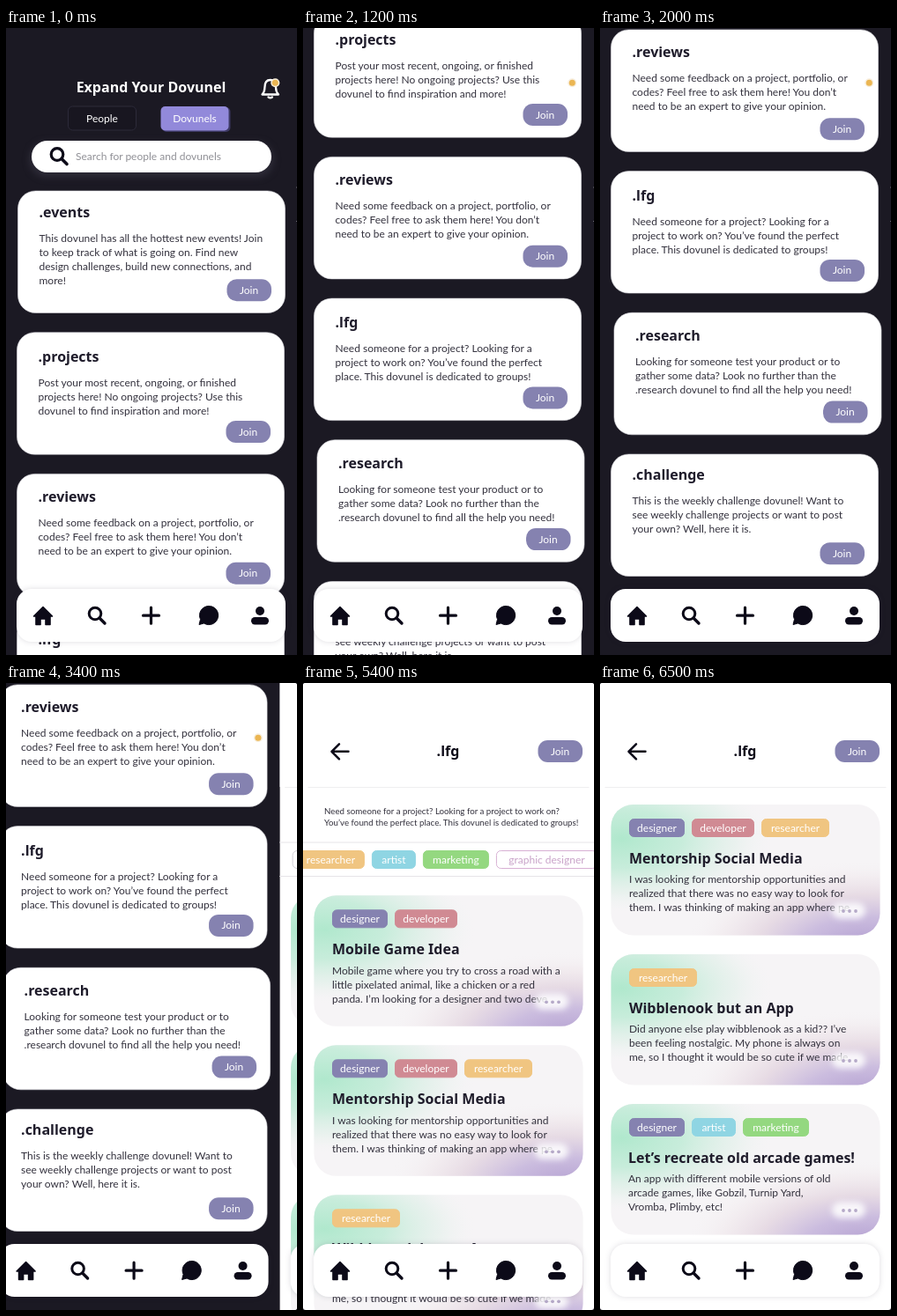
An HTML page that plays this animation: 330 px wide and 712 px high, repeating every 7900 ms.

```html
<!DOCTYPE html>
<html lang="en">
<head>
<meta charset="utf-8">
<style>
  html, body { margin: 0; height: 100%; overflow: hidden; background: #1b1923; }
  svg { display: block; width: 100%; height: 100%; border-radius: 3px; }
  text { font: 12px Lato, sans-serif; fill: #33313d; }
  .title { font: bold 16px "Noto Sans", sans-serif; fill: #1f1c2b; }
  .small { font-size: 9.75px; }
  .nav { filter: drop-shadow(0 0 3px rgba(30, 20, 50, .15)); }
  .glow { filter: blur(3.5px); }
</style>
</head>
<body>
<svg id="stage" viewBox="0 0 330 712">
  <defs>
    <radialGradient id="mint" cx=".04" cy=".26" r=".56">
      <stop offset="0" stop-color="#b0e8cd"/>
      <stop offset=".4" stop-color="#bfebd6" stop-opacity=".85"/>
      <stop offset=".75" stop-color="#dcefe6" stop-opacity=".5"/>
      <stop offset="1" stop-color="#f0f4f3" stop-opacity="0"/>
    </radialGradient>
    <radialGradient id="lilac" cx=".95" cy="1.1" r=".68">
      <stop offset="0" stop-color="#b09ccf"/>
      <stop offset=".35" stop-color="#c6b6dc" stop-opacity=".9"/>
      <stop offset=".6" stop-color="#e3d5e0" stop-opacity=".8"/>
      <stop offset=".8" stop-color="#f0e8ec" stop-opacity=".6"/>
      <stop offset="1" stop-color="#f6f4f6" stop-opacity="0"/>
    </radialGradient>
  </defs>
</svg>
<script>
const INK = '#0c0a18', PURPLE = '#8582b0';

const rect = (x, y, w, h, r, fill, extra = '') =>
  `<rect x="${x}" y="${y}" width="${w}" height="${h}" rx="${r}" fill="${fill}" ${extra}/>`;
const text = (x, y, str, extra = '') => `<text x="${x}" y="${y}" ${extra}>${str}</text>`;
const centered = (x, y, str, color, extra = '') =>
  text(x, y, str, `text-anchor="middle" style="fill:${color}" ${extra}`);
const line = (d, width, color = INK) =>
  `<path d="${d}" fill="none" stroke="${color}" stroke-width="${width}" stroke-linecap="round" stroke-linejoin="round"/>`;
const group = (id, body) => `<g id="${id}">${body}</g>`;
const paragraph = (x, y, lines, step = 16, extra = '') =>
  lines.map((str, i) => text(x, y + i * step, str, extra)).join('');
const join = (x, y) => rect(x, y, 50.5, 25, 11, PURPLE) + centered(x + 25, y + 16.5, 'Join', '#fff');
const magnifier = (x, y, width) =>
  `<circle cx="${x - 2}" cy="${y - 2}" r="6.8" fill="none" stroke="${INK}" stroke-width="${width}"/>` +
  line(`M${x + 3.5} ${y + 3.5}l5.5 5.5`, width + .4);

const navBar = () => `<g class="nav">${rect(12, 637, 305, 60, 17, '#fff')}</g>` +
  `<path d="M31.5 668L42 657.5L52.5 668H50V677.5H45V671H39V677.5H34V668Z" fill="${INK}" stroke="${INK}" stroke-width="1.6" stroke-linejoin="round"/>` +
  magnifier(103, 667, 3) +
  line('M155.5 667.2h18M164.5 658.2v18', 3.2) +
  `<path d="M219 677.5l1.5-6a10.6 10.6 0 1 1 4 4.5z" fill="${INK}" stroke="${INK}" stroke-linejoin="round"/>` +
  `<circle cx="288" cy="662" r="5" fill="${INK}"/>` + rect(278, 669, 20, 8.5, 4.2, INK);

// First screen: groups to join
const groups = [
  ['.events', 13, 57.5, ['This dovunel has all the hottest new events! Join', 'to keep track of what is going on. Find new', 'design challenges, build new connections, and', 'more!']],
  ['.projects', 12, 61.5, ['Post your most recent, ongoing, or finished', 'projects here! No ongoing projects? Use this', 'dovunel to find inspiration and more!']],
  ['.reviews', 12, 59.5, ['Need some feedback on a project, portfolio, or', 'codes? Feel free to ask them here! You don’t', 'need to be an expert to give your opinion.']],
  ['.lfg', 12, 61, ['Need someone for a project? Looking for a', 'project to work on? You’ve found the perfect', 'place. This dovunel is dedicated to groups!']],
  ['.research', 15.5, 60, ['Looking for someone test your product or to', 'gather some data? Look no further than the', '.research dovunel to find all the help you need!']],
  ['.challenge', 12, 56.5, ['This is the weekly challenge dovunel! Want to', 'see weekly challenge projects or want to post', 'your own? Well, here it is.']],
];
const groupCard = ([title, x, top, lines], i) => {
  const y = 185 + i * 160.7;
  return rect(x + .5, y, 303, 138.5, 20, '#fff', 'stroke="#d9d8de" stroke-width=".6"') +
    text(x + 24.5, y + top - 28, title, 'class="title"') +
    paragraph(x + 24.5, y + top, lines) + join(x + 237.5, y + 100.3);
};

const exploreScreen = rect(0, 0, 330, 712, 0, '#1b1923') +
  group('groupList',
    centered(164.5, 72.5, 'Expand Your Dovunel', '#fff', 'class="title" ') +
    rect(70.5, 89, 77, 27, 5, '#181620', 'stroke="#2c2a39"') + centered(109, 106.5, 'People', '#fff') +
    rect(177, 90, 77.5, 28, 5, '#3d3963') + rect(175.5, 89, 77, 27.5, 5, '#9289da') +
    centered(214, 107, 'Dovunels', '#fff') +
    rect(26, 129, 278, 41, 20, '#2b2935', 'class="glow"') + rect(29, 128, 272, 36, 18, '#fff') +
    magnifier(60, 145.5, 3.2) + text(79, 149.5, 'Search for people and dovunels', 'style="fill:#909096"') +
    groups.map(groupCard).join('')) +
  line('M290.5 75.5h18.5c-2.5-2.5-3-4-3-8c0-5-2-8.5-6.3-8.5s-6.3 3.5-6.3 8.5c0 4-.5 5.5-2.9 8zM297.5 78.5q2.2 1.6 4.4 0', 2.3, '#fff') +
  '<circle cx="305.3" cy="62.3" r="5" fill="#f7eedd"/><circle cx="305.3" cy="62.3" r="3.5" fill="#ebb653"/>' +
  navBar();

// Second screen: posts inside one group
const tags = {
  All: [34, '#fff', '#33313d', '#cfced4'],
  designer: [63, PURPLE], developer: [71, '#d08a93'], researcher: [77, '#f0c581'],
  artist: [50, '#8fd5e3'], marketing: [75, '#94d880'],
  'graphic designer': [115, '#fff', '#c9a3c9', '#d7b0d4'],
};
const tagRow = (x, y, names) => names.map(name => {
  const [w, fill, color = '#fff', border = fill] = tags[name];
  const tag = rect(x + .5, y + .5, w - 1, 20, 5, fill, `stroke="${border}"`) + centered(x + w / 2, y + 14.7, name, color);
  x += w + 8;
  return tag;
}).join('');

const posts = [
  ['Mobile Game Idea', ['designer', 'developer'], ['Mobile game where you try to cross a road with a', 'little pixelated animal, like a chicken or a red', 'panda. I’m looking for a designer and two deve']],
  ['Mentorship Social Media', ['designer', 'developer', 'researcher'], ['I was looking for mentorship opportunities and', 'realized that there was no easy way to look for', 'them. I was thinking of making an app where pe']],
  ['Wibblenook but an App', ['researcher'], ['Did anyone else play wibblenook as a kid?? I’ve', 'been feeling nostalgic. My phone is always on', 'me, so I thought it would be so cute if we made']],
  ['Let’s recreate old arcade games!', ['designer', 'artist', 'marketing'], ['An app with different mobile versions of old', 'arcade games, like Gobzil, Turnip Yard,', 'Vromba, Plimby, etc!']],
];
const postCard = ([title, names, lines], i) => {
  const y = 241.3 + i * 170, x = i === 3 ? 32 : 33;
  return ['#f6f4f6', 'url(#mint)', 'url(#lilac)'].map(fill => rect(12.5, y, 305, 148.5, 25, fill)).join('') +
    tagRow(33, y + 16, names) + text(x, y + 66.7, title, 'class="title"') +
    paragraph(x, y + 89.3, lines) +
    rect(263, y + 111.5, 38, 18, 9, '#fff', 'class="glow" opacity=".85"') +
    [276, 283, 290].map(cx => `<circle cx="${cx}" cy="${y + 121}" r="1.9" fill="#b5a9c8"/>`).join('');
};

const groupScreen = rect(0, 0, 330, 712, 0, '#fff') +
  group('postList',
    paragraph(24, 148.5, ['Need someone for a project? Looking for a project to work on?', 'You’ve found the perfect place. This dovunel is dedicated to groups!'], 13.5, 'class="small"') +
    line('M0 181h330M0 219.5h330', 1, '#e6e4e8') +
    group('filters', tagRow(14, 190, Object.keys(tags))) +
    posts.map(postCard).join('')) +
  rect(0, 0, 330, 118, 0, '#fff') + line('M6 118.5h318', 1, '#efeef0') +
  line('M51.5 77.8h-19m8.5-8.5l-8.5 8.5l8.5 8.5', 2.5) +
  centered(164.5, 83, '.lfg', INK, 'class="title"') + join(266.5, 65) + navBar();

const stage = document.getElementById('stage');
stage.insertAdjacentHTML('beforeend',
  group('explore', exploreScreen) + group('group', groupScreen));

const move = (id, x, y) =>
  document.getElementById(id).setAttribute('transform', `translate(${x} ${y})`);
const ease = (t, from, to) => {
  const p = Math.min(1, Math.max(0, (t - from) / (to - from)));
  return p * p / (p * p + (1 - p) * (1 - p));
};

function draw(now) {
  const t = Math.floor(now % 7900 / 100) * 100; // the picture advances ten times a second
  const slide = 330 * ease(t, 3300, 3800);
  move('explore', -slide, 0);
  move('group', 330 - slide, 0);
  move('groupList', 0, -360 * ease(t, 800, 1200) - 95 * ease(t, 1300, 1600) - 49.5 * ease(t, 1800, 2000));
  move('filters', -231 * (ease(t, 4280, 4700) - ease(t, 5313, 5700)), 0);
  move('postList', 0, -273.3 * ease(t, 6100, 6500));
}

const start = performance.now();
function tick() {
  draw(performance.now() - start);
  requestAnimationFrame(tick);
}
tick();
</script>
</body>
</html>
```
